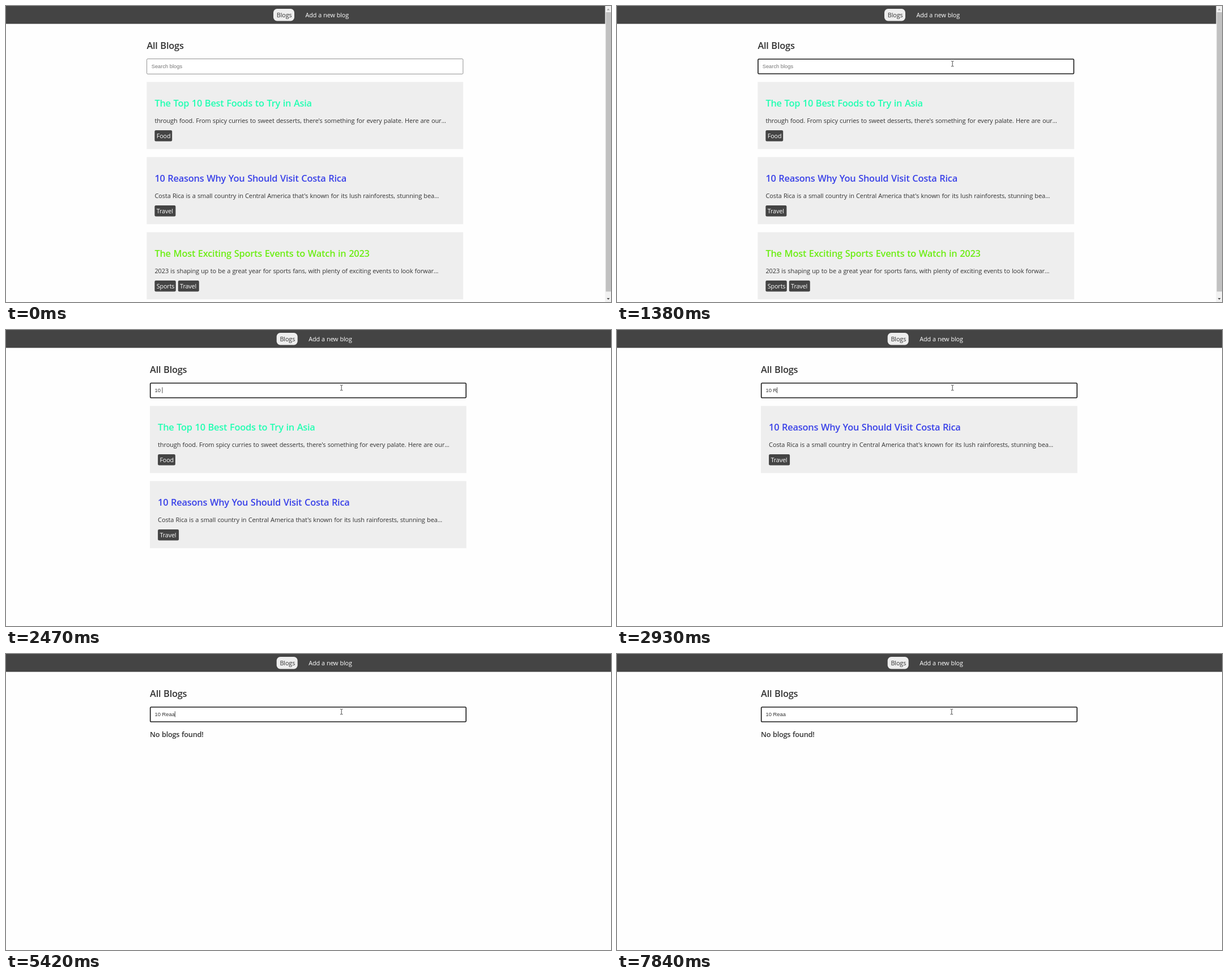
An HTML page that plays this animation: 1068 by 524 pixels, repeating every 8 s.

```html
<!DOCTYPE html>
<html lang="en">
<head>
<meta charset="utf-8">
<title>All Blogs</title>
<style>
  html, body { margin: 0; width: 100%; height: 100%; overflow: hidden; background: #fefefe; }
  svg { display: block; width: 1068px; height: 524px; }
  text { font-family: "Trebuchet MS", "Open Sans", sans-serif; fill: #333; white-space: pre; }
  .body { font-size: 11px; letter-spacing: -.115px; word-spacing: .5px; }
  .nav { font-size: 10.8px; letter-spacing: -.13px; word-spacing: .4px; }
  .tag { font-size: 10.8px; font-weight: 500; letter-spacing: -.13px; fill: #fff; }
  .light { fill: #fff; font-weight: 500; }
  .title { font-size: 16.4px; font-weight: 600; letter-spacing: -.24px; word-spacing: .7px; }
  .note { font-size: 12.8px; font-weight: 600; letter-spacing: -.3px; word-spacing: .7px; }
  .field { font-family: "Liberation Sans", Arial, sans-serif; font-size: 9.33px; }
</style>
</head>
<body>
<svg id="stage" viewBox="0 0 1068 524"></svg>
<script>
const LOOP = 8000;
const stage = document.getElementById('stage');

function add(parent, tag, attrs = {}, text) {
  const node = document.createElementNS('http://www.w3.org/2000/svg', tag);
  for (const key in attrs) node.setAttribute(key, attrs[key]);
  if (text !== undefined) node.textContent = text;
  parent.appendChild(node);
  return node;
}
const box = (parent, x, y, width, height, fill, rx = 0) =>
  add(parent, 'rect', { x, y, width, height, fill, rx });
const label = (parent, cls, x, y, text) => add(parent, 'text', { class: cls, x, y }, text);
const show = (node, on) => node.setAttribute('visibility', on ? 'visible' : 'hidden');

// Page
box(stage, 0, 0, 1068, 31.6, '#444');
const page = add(stage, 'g');
box(page, 472, 5, 37, 21.4, '#eee', 6.5);
label(page, 'nav', 477.8, 20, 'Blogs');
label(page, 'nav light', 528.5, 20, 'Add a new blog');
label(page, 'title', 248.4, 75.5, 'All Blogs');

const input = add(page, 'rect', { fill: '#fff', rx: 1.6 });
const hint = label(page, 'field', 256.7, 110, 'Search blogs');
hint.style.fill = '#757575';
const typed = label(page, 'field', 256.9, 110, '');
const caret = box(page, 0, 101.4, .8, 10.4, '#222');

const cards = [
  ['#22ffb2', 'The Top 10 Best Foods to Try in Asia',
    "through food. From spicy curries to sweet desserts, there's something for every palate. Here are our...",
    [['Food', 30.8]]],
  ['#3a42e8', '10 Reasons Why You Should Visit Costa Rica',
    "Costa Rica is a small country in Central America that's known for its lush rainforests, stunning bea...",
    [['Travel', 37]]],
  ['#6cee14', 'The Most Exciting Sports Events to Watch in 2023',
    '2023 is shaping up to be a great year for sports fans, with plenty of exciting events to look forwar...',
    [['Sports', 37.4], ['Travel', 37]]]
].map(([color, title, intro, tags]) => {
  const card = add(page, 'g');
  box(card, 248.4, 134.5, 558.6, 118.8, '#eee');
  label(card, 'title', 262.4, 178, title).style.fill = color;
  label(card, 'body', 262.4, 206.5, intro);
  let x = 262.4;
  for (const [name, width] of tags) {
    box(card, x, 220, width, 19.5, '#444', 2.2);
    label(card, 'tag', x + 3.3, 234, name);
    x += width + 4;
  }
  return { card, title };
});
const none = label(page, 'note', 248.4, 147, 'No blogs found!');

// Scrollbar
const bar = add(stage, 'g');
box(bar, 1057.6, 0, 10.4, 524, '#f1f1f1');
box(bar, 1058.8, 11, 9.2, 494.5, '#c1c1c1');
add(bar, 'path', { d: 'M1060.6 7.4h5.2l-2.6-3z', fill: '#a3a3a3' });
add(bar, 'path', { d: 'M1060.6 517h5.2l-2.6 3z', fill: '#505050' });

// Pointers
const arrow = add(stage, 'path', {
  d: 'M0 0V11.5L2.7 9L4.5 13L6.2 12.2L4.5 8.3H8Z', fill: '#fff', stroke: '#111', 'stroke-width': .7
});
const beam = add(stage, 'path', {
  d: 'M-2.3 -4.6H-.7L0 -4L.7 -4.6H2.3M0 -4V4M-2.3 4.6H-.7L0 4L.7 4.6H2.3',
  fill: 'none', stroke: '#333', 'stroke-width': .9
});

// [time, query, caret]
const typing = [
  [0, '', 0], [840, '', 1], [1380, '', 0], [1450, '1', 1], [1770, '10', 1],
  [2320, '10', 0], [2470, '10 ', 1], [2930, '10 R', 1], [3250, '10 Re', 1],
  [3400, '10 Rea', 1], [3950, '10 Rea', 0], [4410, '10 Rea', 1], [4960, '10 Rea', 0],
  [5420, '10 Reaa', 1], [5590, '10 Reaas', 1], [5760, '10 Reaasd', 1],
  [5810, '10 Reaasdas', 1], [5980, '10 Reaasdasd', 1], [6530, '10 Reaasdasd', 0],
  [7060, '10 Reaasdas', 1], [7610, '10 Reaasdas', 0], [7690, '10 Reaasd', 1],
  [7760, '10 Reaas', 1], [7840, '10 Reaa', 0]
];

const pen = document.createElement('canvas').getContext('2d');
pen.font = '9.33px "Liberation Sans", Arial, sans-serif';

function drawPointer(t) {
  const step = Math.min(10, Math.floor(t / 70) - 1);
  const k = 1 - Math.max(0, step) / 10;
  const away = k * k * (3 - 2 * k);
  const x = (t < 6680 ? 592.2 : 590.8) + 238 * away;
  const y = 102.2 + 386 * away;
  const inField = y < 121;
  show(arrow, t >= 70 && !inField);
  show(beam, t >= 70 && inField);
  for (const node of [arrow, beam]) node.setAttribute('transform', `translate(${x} ${y})`);
}

function draw(t) {
  const [, query, caretOn] = typing.findLast(row => row[0] <= t);
  const focused = t >= 840;
  const scrolls = query === '';
  page.setAttribute('transform', `translate(${scrolls ? 0 : 5.7} 0)`);
  show(bar, scrolls);
  show(hint, scrolls);

  const line = focused ? 1.6 : .8;
  const set = {
    x: 248.2 + line / 2, y: 93.2 + line / 2, width: 559 - line, height: 27.6 - line,
    stroke: focused ? '#181818' : '#767676', 'stroke-width': line
  };
  for (const key in set) input.setAttribute(key, set[key]);

  typed.textContent = query;
  caret.setAttribute('x', 256.9 + pen.measureText(query).width);
  show(caret, caretOn);

  let row = 0;
  for (const { card, title } of cards) {
    const match = title.includes(query);
    show(card, match);
    if (match) card.setAttribute('transform', `translate(0 ${133 * row++})`);
  }
  show(none, row === 0);
  drawPointer(t);
}

const start = performance.now();
function tick() {
  draw((performance.now() - start) % LOOP);
  requestAnimationFrame(tick);
}
tick();
</script>
</body>
</html>
```
